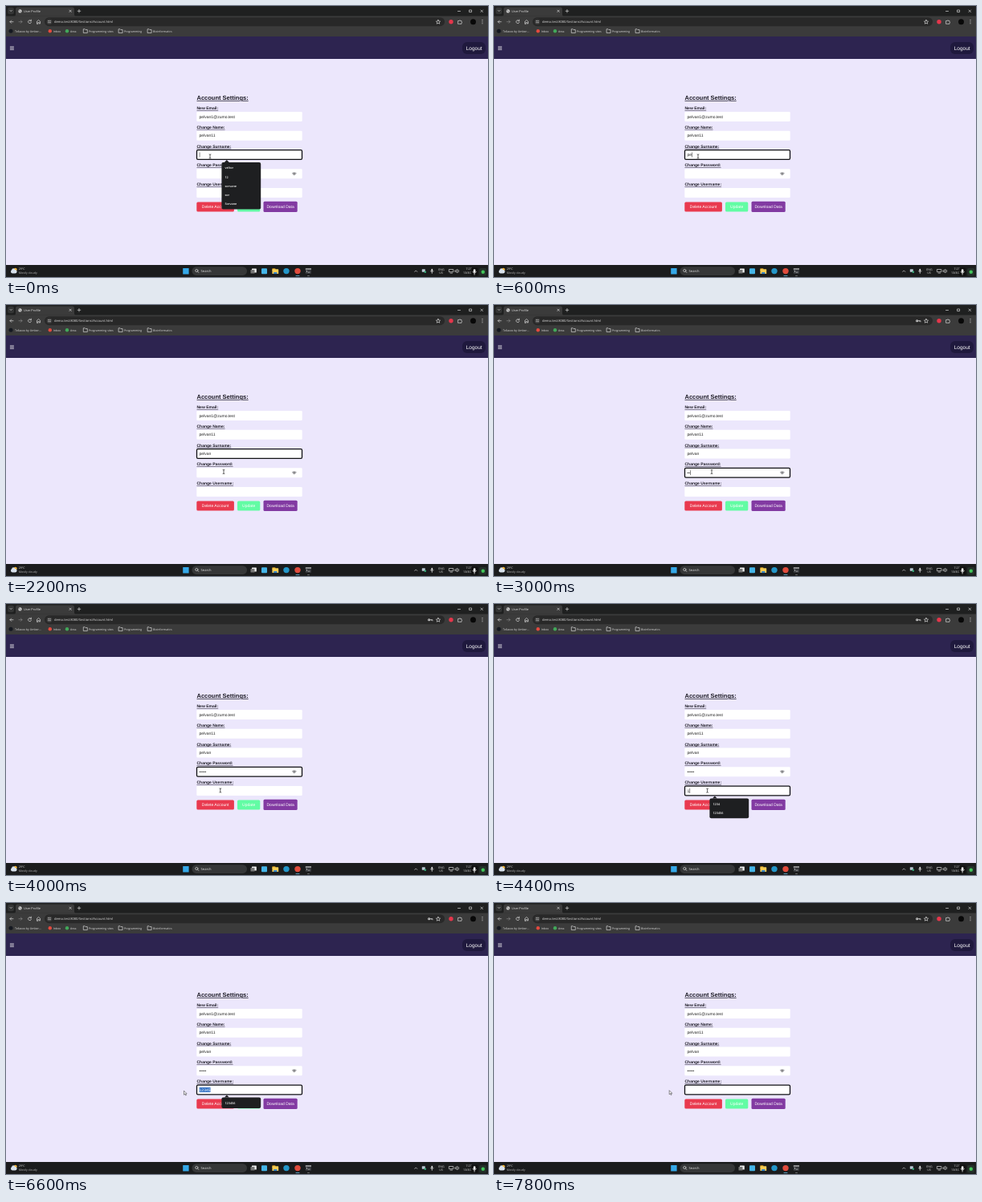
Recreate the animation shown at these times as an HTML page. Size 600x338 px, loop 8 s.

```html
<!DOCTYPE html>
<html lang="en">
<head>
<meta charset="utf-8">
<title>Account settings</title>
<style>
html, body { margin: 0; width: 100%; height: 100%; overflow: hidden; background: #ece7fc; }
svg { display: block; width: 100%; height: 100%; }
text { font-family: "Open Sans", "Noto Sans", sans-serif; text-rendering: geometricPrecision; white-space: pre; }
.page text { font-family: "Liberation Sans", Arial, sans-serif; }
.label { font-weight: bold; text-decoration: underline; }
.line { fill: none; stroke: #d6d6d6; stroke-width: .7; stroke-linecap: round; stroke-linejoin: round; }
</style>
</head>
<body>
<svg id="stage" viewBox="0 0 600 338" preserveAspectRatio="none"></svg>
<script>
const stage = document.getElementById('stage');
const ROWS = [138, 161.7, 185.5, 209.2, 233];
const LEFT = 240.6;

const rect = (x, y, w, h, fill, r = 0, more = '') =>
  `<rect x="${x}" y="${y}" width="${w}" height="${h}" fill="${fill}" rx="${r}" ${more}/>`;
const dot = (x, y, r, fill) => `<circle cx="${x}" cy="${y}" r="${r}" fill="${fill}"/>`;
const line = (d, more = '') => `<path class="line" d="${d}" ${more}/>`;
const text = (x, y, size, str, fill = '#e3e3e3', more = '') =>
  `<text x="${x}" y="${y}" font-size="${size}" fill="${fill}" ${more}>${str}</text>`;
const folder = x => line(`M${x - 2.4} 33.2v-4.4h2l.7.8h2.3v3.6z`);

function browser() {
  return rect(0, 0, 600, 14, '#1f2020') + rect(0, 12.5, 600, 26, '#3b3b3b') +
    // tab strip
    rect(2, 1.8, 8, 8.4, '#343535', 2.5) + line('M5 5.4l1.2 1.2 1.2-1.2') +
    `<path d="M10 12.7q2 0 2-2V4q0-2.5 2.5-2.5h68q2.5 0 2.5 2.5v6.700q0 2 2 2z" fill="#3b3b3b"/>` +
    dot(17.5, 6.4, 2.2, '#d6d6d6') + line('M15.6 6h2l1 1.400', 'style="stroke:#555"') +
    text(22, 7.8, 3.85, 'User Profile') +
    line('M78.900 5.100l2.400 2.400m0-2.400l-2.400 2.400M89.200 6.300h3.600m-1.800-1.800v3.600') +
    line('M562.500 6.500h3M577 5h2.600v2.600h-2.600zM591 5l2.600 2.600m0-2.600l-2.600 2.600') +
    // toolbar
    line('M9 19.700h-4m1.700-1.700l-1.700 1.700 1.700 1.700') +
    line('M16 19.700h4m-1.700-1.700l1.700 1.700-1.700 1.700', 'opacity=".45"') +
    line('M31.300 18.600a2 2 0 1 0 .2 1.700m-.1-3.200v1.600h-1.600') +
    line('M38.500 22v-2.800l2-1.700 2 1.700v2.800h-1.300v-1.500h-1.400v1.500z') +
    rect(48, 14.2, 498, 11, '#282828', 5.5) + dot(54, 19.7, 3.4, '#3b3b3b') +
    line('M52.500 18.700h1.800m1 0h.2M52.500 20.700h.2m1 0h1.800') +
    text(60, 21.2, 4.05, 'demo.test:8080/Sections/Account.html') +
    line('M538 17.300l.8 1.700 1.800.2-1.300 1.200.4 1.800-1.700-.9-1.700.9.4-1.800-1.300-1.200 1.800-.2z') +
    `<g id="key">${dot(526.6, 19.7, 1.5, '#d6d6d6')}${dot(526.4, 19.7, .5, '#282828')}${line('M528 19.700h3v1.200m-1.200-1.200v.9')}</g>` +
    dot(554, 19.7, 2.7, '#e5364b') +
    line('M563 18.500h1.400q.6-1.800 1.200 0h1.400v1.300q1.500.6 0 1.200v1.300h-4z') +
    dot(581.5, 19.7, 3.5, '#080808') +
    [17.6, 19.7, 21.8].map(y => dot(593, y, .55, '#ddd')).join('') +
    // bookmarks
    dot(6, 31.3, 2.5, '#141820') + text(11, 32.6, 3.5, 'Tellavox by Umber...') +
    dot(54.8, 31.3, 2.2, '#e34a3f') + text(59, 32.6, 3.5, 'Inbox') +
    dot(76, 31.3, 2.2, '#42a85a') + text(80, 32.6, 3.5, 'Area') +
    folder(98.7) + text(103, 32.6, 3.5, 'Programming sites') +
    folder(142.5) + text(147, 32.6, 3.5, 'Programming') +
    folder(178.5) + text(183, 32.6, 3.5, 'Bioinformatics');
}

const button = (x, y, w, h, fill, label) => rect(x, y, w, h, fill, 1.5) +
  text(x + w / 2, y + h / 2 + 1.7, 5, label, '#fff', 'text-anchor="middle"');

function page() {
  const labels = ['New Email:', 'Change Name:', 'Change Surname:', 'Change Password:', 'Change Username:'];
  return `<g class="page">` + rect(0, 38, 600, 285, '#ece7fc') + rect(0, 38, 600, 28, '#2d2450') +
    line('M5.300 50.800h4.200m-4.200 1.800h4.200m-4.200 1.800h4.200', 'style="stroke:#fff"') +
    rect(568, 45, 29, 15, '#1f193d', 6) + text(572.7, 54.6, 6.5, 'Logout', '#fff') +
    text(237.5, 116.9, 7.5, 'Account Settings:', '#1d1b25', 'class="label"') +
    ROWS.map((y, i) => text(237.5, y - 8.8, 5, labels[i], '#1d1b25', 'class="label"') +
      rect(237.3, y - 6, 131.4, 12, '#fff', 1.2) +
      `<g id="ring${i}">${rect(237.5, y - 5.8, 131, 11.7, 'none', 1.4, 'stroke="#101014" stroke-width="1.3"')}</g>`).join('') +
    rect(LEFT, 230, 0, 6, '#2f6fc4', 0, 'id="selection"') +
    ROWS.map((y, i) => text(LEFT, y + 1.7, 5, '', '#222', `id="value${i}"`)).join('') +
    rect(0, 0, .5, 6, '#111', 0, 'id="caret"') +
    `<path d="M355.800 208.500q3-2.600 6 0q-1.200 2-3 3q-1.800-1-3-3z" fill="#a9a9ad"/>` +
    dot(358.8, 209.1, .8, '#666') +
    button(237.3, 244.4, 46.6, 12, '#e93a4f', 'Delete Account') +
    button(288, 244.4, 28.3, 12, '#62fca4', 'Update') +
    button(320.5, 243.7, 42.2, 13.3, '#823aa2', 'Download Data') + '</g>';
}

function taskbar() {
  const small = (x, y, s) => text(x, y, 3.6, s);
  return rect(0, 323, 600, 15, '#1b1c1d') +
    dot(11.7, 328.8, 2, '#f5b83d') + rect(6, 329, 7.500, 4.400, '#d9e2ec', 2.2) + dot(9.2, 329.3, 2, '#d9e2ec') +
    small(15.7, 329.4, '29°C') + text(15.7, 334.2, 3.6, 'Mostly cloudy', '#b8b8b8') +
    rect(220.2, 327, 7.4, 7.4, '#35a8e8', .5) +
    rect(231.5, 325.3, 68.5, 10.600, '#363738', 5.3) +
    `<circle class="line" cx="237.300" cy="330" r="1.600"/>` + line('M238.500 331.200l1.400 1.400') +
    text(242.6, 332, 4.1, 'Search') +
    rect(306, 327.5, 5.8, 5, '#eee', .5) + rect(304.5, 329, 5, 4.600, '#777', .5) +
    rect(318, 327.2, 7, 7, '#45b5e8', 1) +
    rect(331.4, 327.3, 4, 3, '#d99d20', .5) + rect(331.4, 328.3, 7.800, 5.800, '#f6cd55', .6) + rect(333.2, 332, 4.200, 2.1, '#3585c8') +
    dot(349, 330.6, 3.7, '#2496c8') + dot(363, 330.6, 3.7, '#e04b3c') + rect(360.5, 336.2, 5, .9, '#6cc3ee', .4) +
    rect(372.8, 327.3, 7.200, 6.6, '#34363a', .6) + rect(372.8, 327.3, 7.2, 1.3, '#b8b8b8') + line('M374 330l1 .9-1 .9m2 .3h2') +
    rect(375, 336.2, 3, .8, '#888', .4) +
    line('M508.800 331.400l1.500-1.500 1.500 1.500') +
    rect(517.8, 328.3, 4, 3.5, '#b9c7d2', .5) + dot(521.8, 331.8, 1.3, '#38aa7a') +
    rect(529.4, 327.8, 1.800, 3.5, '#ddd', .9) + line('M528.600 330.600q1.700 3.200 3.400 0m-1.700 1.600v1.300') +
    small(538.3, 329.5, 'ENG') + small(539.3, 334.2, 'US') +
    line('M551.800 328.500h5v3.200h-5zm1.200 4.600h2.600M559.300 329.800h1l1.500-1.400v4.400l-1.500-1.400h-1zm4-.6q1 1.400 0 2.800') +
    text(579.5, 329.4, 3.6, '7:27', '#e3e3e3', 'text-anchor="end"') +
    small(569, 334.2, '13/8/20') +
    rect(578.8, 326.6, 8.700, 10.2, '#111', 1.5) + rect(581.9, 328.3, 2.5, 4.300, '#fff', 1.2) +
    line('M580.900 331.400q2.200 3.800 4.400 0m-2.200 2v1.800', 'style="stroke:#fff"') +
    rect(589.2, 327, 9, 9.5, '#25302a', 1.5) + dot(593.8, 331.7, 2.2, '#43c55a');
}

stage.innerHTML = browser() + page() + '<g id="menu"></g>' + taskbar() +
  `<g id="beam"><path d="M-1.300 -2.600q1.300 0 1.300.7q0-.7 1.300-.7M0-2v4M-1.300 2.600q1.300 0 1.300-.7q0 .7 1.300.7" fill="none" stroke="#222" stroke-width=".7"/></g>
  <g id="arrow"><path d="M0-2.300v5l1.200-1.100.9 1.900.8-.4-.9-1.800h1.600z" fill="#fff" stroke="#222" stroke-width=".5"/></g>`;

const el = id => document.getElementById(id);
const show = (id, on) => el(id).setAttribute('visibility', on ? 'visible' : 'hidden');
const set = (id, attrs) => { for (const k in attrs) el(id).setAttribute(k, attrs[k]); };

// Times at which each character arrives
const KEYS = {
  2: [200, 600, 800, 1000, 1200, 1400],
  3: [2800, 3000, 3200, 3400, 3600],
  4: [4400, 4600, 4800, 5000, 5600]
};
const WORDS = { 2: 'pelvan', 3: '•••••', 4: '12345' };
const CLEAR = 7400;
const PATH = [[0, 254, 187.5], [1400, 254, 187.5], [2000, 271, 208], [3400, 271, 208], [4000, 266.8, 232.5],
  [5000, 263.300, 233], [5800, 263.300, 233], [6600, 221.5, 236.5], [7000, 218.2, 236], [8000, 218.2, 236]];

function mouseAt(t) {
  const i = PATH.findIndex((p, n) => n && t <= p[0]);
  const [a, b] = [PATH[i - 1], PATH[i]];
  const k = (t - a[0]) / (b[0] - a[0]), e = k * k * (3 - 2 * k);
  return [a[1] + (b[1] - a[1]) * e, a[2] + (b[2] - a[2]) * e];
}

function suggestions(t) {
  if (t < 200) return ['veltor', '12', 'sorvane', 'sor', 'Sorvane'];
  if (t >= 4200 && t < 5600) return ['1234', '123456'];
  return t >= 5600 && t < CLEAR ? ['123456'] : [];
}

function drawMenu(items, y) {
  const top = y + 9.6;
  el('menu').innerHTML = items.length ?
    `<path d="M271.800 ${top}l3-3 3 3z" fill="#1e1f21"/>` +
    rect(268.4, top - .2, 48.8, items.length * 11.3 + 2.2, '#1e1f21', 2) +
    items.map((s, i) => text(272.4, top + 8.1 + i * 11.3, 3.8, s, '#f2f2f2', 'font-weight="600"')).join('') : '';
}

function draw(now) {
  const t = Math.floor(now % 8000 / 200) * 200;
  const focus = t < 2400 ? 2 : t < 4200 ? 3 : 4;
  const values = ['pelvan1@zumo.test', 'pelvan11'];
  for (const i of [2, 3, 4]) values[i] = WORDS[i].slice(0, KEYS[i].filter(k => k <= t).length);
  if (t >= CLEAR) values[4] = '';
  values.forEach((v, i) => {
    el('value' + i).textContent = v;
    show('ring' + i, i === focus);
  });
  show('key', t >= KEYS[3][0]);
  drawMenu(suggestions(t), ROWS[focus]);

  const [x, y] = mouseAt(t);
  const end = LEFT + (values[focus] ? el('value' + focus).getComputedTextLength() : 0);
  const from = Math.max(LEFT, Math.min(end, x));
  const selected = t >= 6000 && t < CLEAR && from < end;
  set('selection', { x: from, width: selected ? end - from : 0 });
  set('value4', { fill: selected ? '#fff' : '#222' });

  // The caret blinks from the last keystroke or click
  const marks = [0, 2400, 4200, CLEAR, ...Object.values(KEYS).flat()];
  const last = Math.max(...marks.filter(k => k <= t)) - 110;
  set('caret', { x: end + .2, y: ROWS[focus] - 3 });
  show('caret', !selected && Math.floor((t - last) / 500) % 2 === 0);

  const outside = x < 237;
  show('beam', !outside);
  show('arrow', outside);
  set(outside ? 'arrow' : 'beam', { transform: `translate(${x} ${y})` });
}

const start = performance.now();
function tick() {
  draw(performance.now() - start);
  requestAnimationFrame(tick);
}
tick();
</script>
</body>
</html>
```
